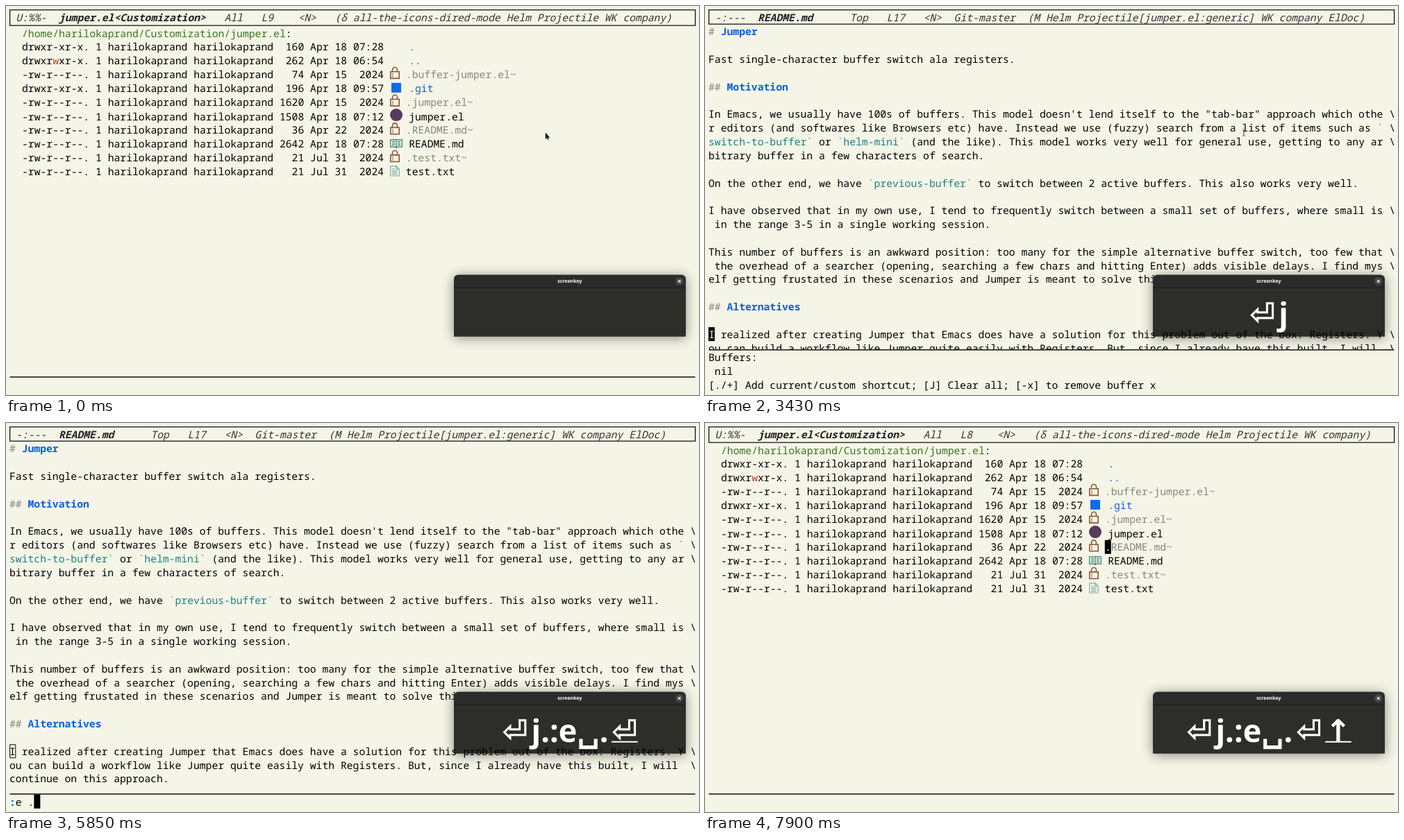
These frames come from a looping animation (998 px wide and 561 px high, 8000 ms). An HTML page with a canvas:

```html
<!DOCTYPE html>
<html lang="en">
<head>
<meta charset="utf-8">
<title>jumper.el</title>
<style>
html, body { margin: 0; width: 100%; height: 100%; overflow: hidden; background: #f5f5e7; }
canvas { display: block; }
</style>
</head>
<body>
<canvas id="stage" width="998" height="561"></canvas>
<script>
const LOOP = 8000, CELL = 8.832, ROW = 19.84;
const BG = '#f5f5e7', BLUE = '#0a5fe0', TEAL = '#1f7f80', GRAY = '#858580';
const MONO = '14.72px "Noto Sans Mono", monospace';
const KEY_SIZE = 45;
const USER = 'harilokaprand';

const README = [
  '# Jumper', '',
  'Fast single-character buffer switch ala registers.', '',
  '## Motivation', '',
  'In Emacs, we usually have 100s of buffers. This model doesn\'t lend itself to the "tab-bar" approach which other editors (and softwares like Browsers etc) have. Instead we use (fuzzy) search from a list of items such as `switch-to-buffer` or `helm-mini` (and the like). This model works very well for general use, getting to any arbitrary buffer in a few characters of search.', '',
  'On the other end, we have `previous-buffer` to switch between 2 active buffers. This also works very well.', '',
  'I have observed that in my own use, I tend to frequently switch between a small set of buffers, where small is in the range 3-5 in a single working session.', '',
  'This number of buffers is an awkward position: too many for the simple alternative buffer switch, too few that the overhead of a searcher (opening, searching a few chars and hitting Enter) adds visible delays. I find myself getting frustated in these scenarios and Jumper is meant to solve this.', '',
  '## Alternatives', '',
  'I realized after creating Jumper that Emacs does have a solution for this problem out of the box: Registers. You can build a workflow like Jumper quite easily with Registers. But, since I already have this built, I will continue on this approach.'
];

// permissions, size, date, icon, name, colour
const FILES = [
  ['drwxr-xr-x.', 160, 'Apr 18 07:28', '', '.', BLUE],
  ['drwxrwxr-x.', 262, 'Apr 18 06:54', '', '..', BLUE],
  ['-rw-r--r--.', 74, 'Apr 15  2024', 'lock', '.buffer-jumper.el~', GRAY],
  ['drwxr-xr-x.', 196, 'Apr 18 09:57', 'square', '.git', BLUE],
  ['-rw-r--r--.', 1620, 'Apr 15  2024', 'lock', '.jumper.el~', GRAY],
  ['-rw-r--r--.', 1508, 'Apr 18 07:12', 'disc', 'jumper.el', '#000'],
  ['-rw-r--r--.', 36, 'Apr 22  2024', 'lock', '.README.md~', GRAY],
  ['-rw-r--r--.', 2642, 'Apr 18 07:28', 'book', 'README.md', '#000'],
  ['-rw-r--r--.', 21, 'Jul 31  2024', 'lock', '.test.txt~', GRAY],
  ['-rw-r--r--.', 21, 'Jul 31  2024', 'page', 'test.txt', '#000']
];

// time, key, how long it stays underlined
const KEYS = [
  [740, '⏎', 160], [2450, ' j', 160], [3510, '.', 160], [5130, ':', 160], [5210, 'e', 240],
  [5290, '␣', 160], [5690, '.', 160], [5850, ' ⏎', 240], [7900, ' ↑', 160]
];
const CURSOR_OFF = [[0, 490], [1220, 1720], [2210, 2450], [2940, 3430], [3910, 4400],
  [4890, 5130], [6500, 6910], [7400, 7900]];

const c = document.getElementById('stage').getContext('2d');
c.textRendering = 'geometricPrecision';
const within = (t, a, b) => t >= a && t < b;
const cursorOn = t => !CURSOR_OFF.some(([a, b]) => within(t, a, b));

function text(str, x, y, color = '#000', style = '') {
  c.font = style + ' ' + MONO;
  c.fillStyle = color;
  c.fillText(str, x, y);
}

function rect(x, y, w, h, color = '#000') {
  c.fillStyle = color;
  c.fillRect(x, y, w, h);
}

function path(d, color, width = 1.2) {
  c.strokeStyle = color;
  c.lineWidth = width;
  c.stroke(new Path2D(d));
}

function block(x, y, char = '') {
  rect(x, y, 9, 20);
  text(char, x + .2, y + 15.6, BG);
}

function modeLine(height, left, name, right) {
  path(`M5.6 5.7h987v${height}h-987z`, '#111', 1.3);
  text(left, 5.3, 22, '#333', 'italic');
  text(name, 5.3 + 8 * CELL, 22, '#222', 'italic bold');
  text(right, 5.3 + (8 + name.length) * CELL, 22, '#333', 'italic');
}

const icons = {
  lock() {
    path('M3.5 -9.5v-2.5a3.5 3.5 0 0 1 7 0v2.5M.8 -9.2h12.4v9.6h-12.4z', '#8b5535', 1.6);
    path('M3 -6.5h2M3 -4.2h2M3 -2h2', '#8b5535', 1);
  },
  square() { rect(2, -13, 14, 14, '#0f6bea'); },
  disc() {
    c.fillStyle = '#573a5c';
    c.beginPath();
    c.arc(9, -7.5, 9, 0, 7);
    c.fill();
  },
  book() {
    path('M.7 -11.4h16.6v10.4h-7l-1.3 1.2l-1.3 -1.2h-7zM9 -11.4v11.4M3 -8.5h4M3 -6.2h4M3 -3.9h4M11 -8.5h4M11 -6.2h4M11 -3.9h4', '#2d7a66');
  },
  page() {
    path('M.7 -13h8.3l4.3 4.3v9.8h-12.6zM9 -13v4.3h4.3M3 -9h3.5M3 -6.3h7.5M3 -3.8h7.5M3 -1.3h7.5', '#7eafa2');
  }
};

function directory(t) {
  const moved = t >= 7900, current = moved ? 6 : 7, top = 44.5;
  modeLine(22.4, ' U:%%-', 'jumper.el<Customization>',
    `   All   L${moved ? 8 : 9}    <N>   (δ all-the-icons-dired-mode Helm Projectile WK company)`);
  const dir = `/home/${USER}/Customization/jumper.el`;
  text(dir, 23, top, '#38761d');
  text(':', 23 + dir.length * CELL, top);
  FILES.forEach(([mode, size, date, icon, name, color], i) => {
    const y = top + (i + 1) * ROW + (i > 4 ? 1 : 0);
    const line = `${mode} 1 ${USER} ${USER} ${String(size).padStart(4)} ${date}`;
    if (mode[5] === 'w') {
      text(line.slice(0, 5), 23, y);
      text('w', 23 + 5 * CELL, y, '#c0392b');
      text(line.slice(6), 23 + 6 * CELL, y);
    } else text(line, 23, y);
    if (icon) {
      c.save();
      c.translate(553, y);
      icons[icon]();
      c.restore();
    }
    const x = icon === 'lock' || icon === 'page' ? 575.8 : 580.2;
    text(name, x, y, color);
    if (i === current && cursorOn(t)) block(x, y - 15.6, name[0]);
  });
}

function readme(t) {
  modeLine(20.4, ' -:---', 'README.md',
    '      Top   L17   <N>  Git-master  (M Helm Projectile[jumper.el:generic] WK company ElDoc)');
  let y = 42.3;
  for (const para of README) {
    const [, hash, title] = para.match(/^(#+) (.*)/) || [];
    if (hash) {
      text(hash, 5, y, GRAY);
      text(title, 5 + (hash.length + 1) * CELL, y, BLUE, 'bold');
      y += ROW;
      continue;
    }
    let code = false;
    for (let i = 0; i === 0 || i < para.length; i += 110) {
      let x = 5;
      for (const part of para.slice(i, i + 110).split(/(`)/)) {
        if (part === '`') code = !code;
        text(part, x, y, part === '`' ? GRAY : code ? TEAL : '#000');
        x += part.length * CELL;
      }
      if (i + 110 < para.length) text('\\', 5 + 111 * CELL, y);
      y += ROW;
    }
  }
  if (t >= 5130) path('M5.6 463.8h8.2v19h-8.2z', '#000', 1);
  else if (cursorOn(t)) block(5, 463.2, 'I');
}

function echoArea(t) {
  const popup = within(t, 2450, 3510);
  const top = popup ? 495.2 : 534.4;
  rect(0, top, 998, 561 - top, BG);
  rect(5.5, top, 987, 1.4);
  if (popup) {
    ['Buffers:', ' nil', '[./+] Add current/custom shortcut; [J] Clear all; [-x] to remove buffer x']
      .forEach((s, i) => text(s, 5, 512.2 + i * ROW));
  } else if (within(t, 3510, 5130)) {
    text('Jumper: Mapped r to README.md', 5, 551.9);
  } else if (within(t, 5130, 5930)) {
    const typed = KEYS.slice(3, 7).filter(k => k[0] <= t).map(k => k[1]).join('').replace('␣', ' ');
    text(':', 5, 551.9, BLUE, 'bold');
    text(typed.slice(1), 5 + CELL, 551.9);
    block(5 + typed.length * CELL, 536);
  }
}

function pointer(t) {
  if (t < 740) {
    const arrow = new Path2D('M776.8 182.6v9.6l2.2 -1.9l1.4 3l1.4 -.7l-1.3 -2.9h2.9z');
    c.strokeStyle = '#fff';
    c.lineWidth = 1;
    c.stroke(arrow);
    c.fillStyle = '#111';
    c.fill(arrow);
  } else if (t < 5130) {
    path('M773.8 177.5q2 0 2.2 1v8q.2 1 2.2 1M778.2 177.5q-2 0 -2.2 1v8q-.2 1 -2.2 1', '#666', .9);
  }
}

function keyWindow(t) {
  const frame = new Path2D(), outside = new Path2D();
  frame.roundRect(645, 387.8, 334, 89, [6, 6, 1, 1]);
  outside.rect(0, 0, 998, 561);
  outside.addPath(frame);

  c.save();
  c.clip(outside, 'evenodd');
  c.shadowColor = 'rgba(0,0,0,.45)';
  c.shadowBlur = 17;
  c.shadowOffsetY = 2;
  c.fillStyle = '#222';
  c.fill(frame);
  c.restore();

  c.save();
  c.clip(frame);
  rect(645, 387, 334, 19, '#2b2b2b');
  rect(645, 406, 334, 1, '#1d1d1d');
  rect(645, 407, 334, 70, 'rgba(0,0,0,.816)');
  c.restore();

  c.font = 'bold 7px "Noto Sans", sans-serif';
  c.textAlign = 'center';
  c.fillStyle = '#fff';
  c.fillText('screenkey', 811.8, 399.4);
  c.textAlign = 'left';
  c.fillStyle = '#434343';
  c.beginPath();
  c.arc(969.7, 397, 6, 0, 7);
  c.fill();
  path('M967.8 395.1l3.8 3.8M971.6 395.1l-3.8 3.8', '#fff', 1.2);

  const shown = KEYS.filter(k => k[0] <= t).map(([at, key, hold]) => {
    const char = key.trim(), symbol = '⏎␣↑'.includes(char);
    const font = `bold ${KEY_SIZE}px ${symbol ? '"DejaVu Sans"' : '"Noto Sans"'}, sans-serif`;
    c.font = font;
    return {
      char, symbol, font,
      gap: key.length > 1 ? KEY_SIZE / 10 : 0,
      width: c.measureText(char).width,
      fresh: t < at + hold
    };
  });
  let x = 812 - shown.reduce((sum, k) => sum + k.gap + k.width, 0) / 2;
  const base = shown.length > 1 ? 459.5 : 458;
  for (const k of shown) {
    x += k.gap;
    c.font = k.font;
    c.fillStyle = '#fff';
    c.fillText(k.char, x, base);
    if (k.fresh) c.fillRect(x, base + (k.symbol ? -.7 : 3), k.width, 2);
    x += k.width;
  }
}

function draw(now) {
  const t = now % LOOP;
  rect(0, 0, 998, 561, BG);
  (within(t, 740, 5930) ? readme : directory)(t);
  echoArea(t);
  pointer(t);
  keyWindow(t);
  requestAnimationFrame(draw);
}
requestAnimationFrame(draw);
</script>
</body>
</html>
```
